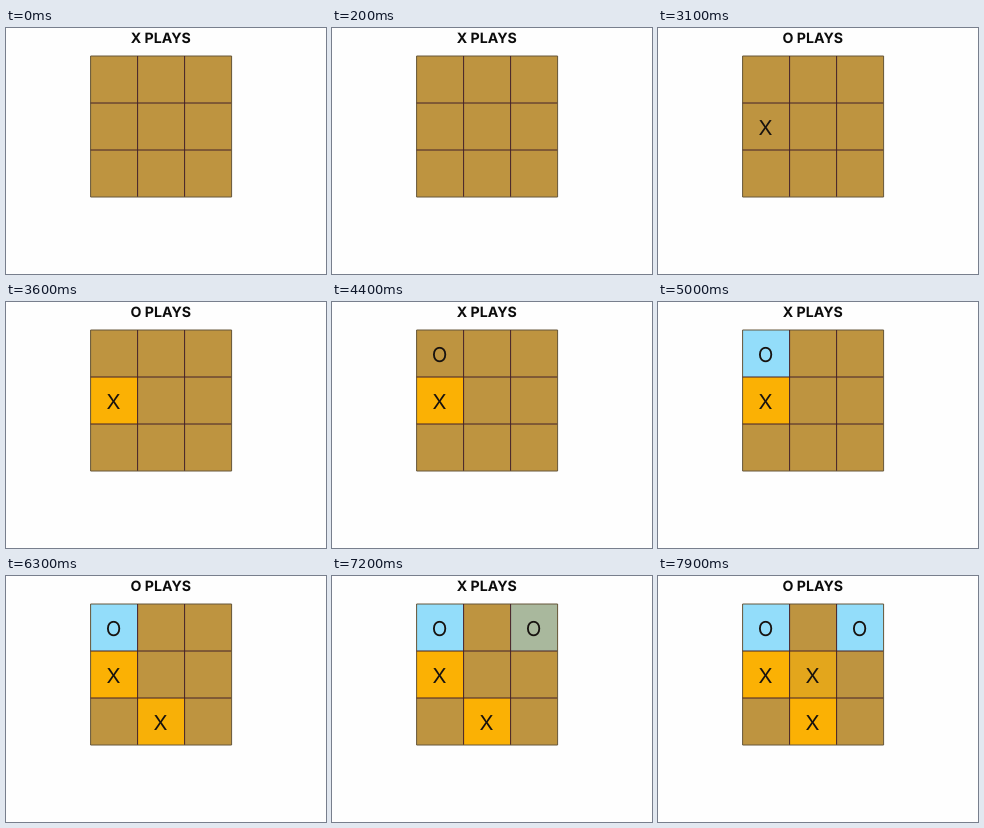
Animation, 320 px wide and 246 px high, one loop 8 s. Source, as an HTML page:

```html
<!DOCTYPE html>
<html lang="en">
<head>
<meta charset="utf-8">
<title>Tic-tac-toe</title>
<style>
  html, body { margin: 0; width: 100%; height: 100%; overflow: hidden; background: #fefefe; }
  svg { display: block; width: 100vw; height: 100vh; }
  text {
    font-family: Inter, "Liberation Sans", sans-serif;
    font-optical-sizing: none;
    text-anchor: middle;
    text-rendering: geometricPrecision;
    fill: #17120f;
  }
  .title { font-size: 14.2px; font-weight: 700; fill: #0c0c0c; }
  .mark { font-size: 20.5px; }
</style>
</head>
<body>
<svg id="stage" viewBox="0 0 320 246" xmlns="http://www.w3.org/2000/svg"></svg>
<script>
const LOOP = 8000, FADE = 500, LAG = 40;
const LEFT = 84.6, TOP = 28, CELL = 47;
const WOOD = [190, 148, 64];
const TINT = { X: [251, 177, 4], O: [147, 221, 250] };
const moves = [
  { at: 3100, col: 0, row: 1, mark: 'X' },
  { at: 4400, col: 0, row: 0, mark: 'O' },
  { at: 5900, col: 1, row: 2, mark: 'X' },
  { at: 7015, col: 2, row: 0, mark: 'O' },
  { at: 7685, col: 1, row: 1, mark: 'X' }
];
const stage = document.getElementById('stage');

function add(tag, attrs, label = '') {
  const node = document.createElementNS('http://www.w3.org/2000/svg', tag);
  for (const key in attrs) node.setAttribute(key, attrs[key]);
  node.textContent = label;
  stage.appendChild(node);
  return node;
}

const rgb = c => `rgb(${c.map(Math.round).join(',')})`;
const mix = (a, b, k) => a.map((v, i) => v + (b[i] - v) * k);

// CSS "ease": cubic-bezier(.25, .1, .25, 1)
function ease(x) {
  if (x <= 0) return 0;
  if (x >= 1) return 1;
  const curve = (a, b, u) => 3 * a * u * (1 - u) ** 2 + 3 * b * u * u * (1 - u) + u ** 3;
  let lo = 0, hi = 1;
  for (let i = 0; i < 20; i++) {
    const mid = (lo + hi) / 2;
    if (curve(0.25, 0.25, mid) < x) lo = mid; else hi = mid;
  }
  return curve(0.1, 1, lo);
}

const title = add('text', { class: 'title', x: 154.8, y: 14.5 });
add('rect', { x: LEFT, y: TOP, width: CELL * 3, height: CELL * 3, fill: rgb(WOOD) });

for (const m of moves) {
  const x = LEFT + m.col * CELL, y = TOP + m.row * CELL;
  m.tile = add('rect', { x, y, width: CELL, height: CELL });
  m.text = add('text', { class: 'mark', x: x + CELL / 2 - 0.5, y: y + CELL / 2 + 8.2 }, m.mark);
}

for (let i = 0; i < 4; i++) {
  const x = LEFT + i * CELL, y = TOP + i * CELL, end = CELL * 3;
  const stroke = i % 3 ? '#43202a' : '#66573a';
  add('path', { d: `M${x} ${TOP}v${end}M${LEFT} ${y}h${end}`, stroke, fill: 'none' });
}

function draw(t) {
  let played = 0;
  for (const m of moves) {
    const shown = t >= m.at;
    if (shown) played++;
    m.text.setAttribute('visibility', shown ? 'visible' : 'hidden');
    m.tile.setAttribute('fill', rgb(mix(WOOD, TINT[m.mark], ease((t - m.at - LAG) / FADE))));
  }
  title.textContent = (played % 2 ? 'O' : 'X') + ' PLAYS';
}

const start = performance.now();
function tick() {
  draw((performance.now() - start) % LOOP);
  requestAnimationFrame(tick);
}
tick();
</script>
</body>
</html>
```
